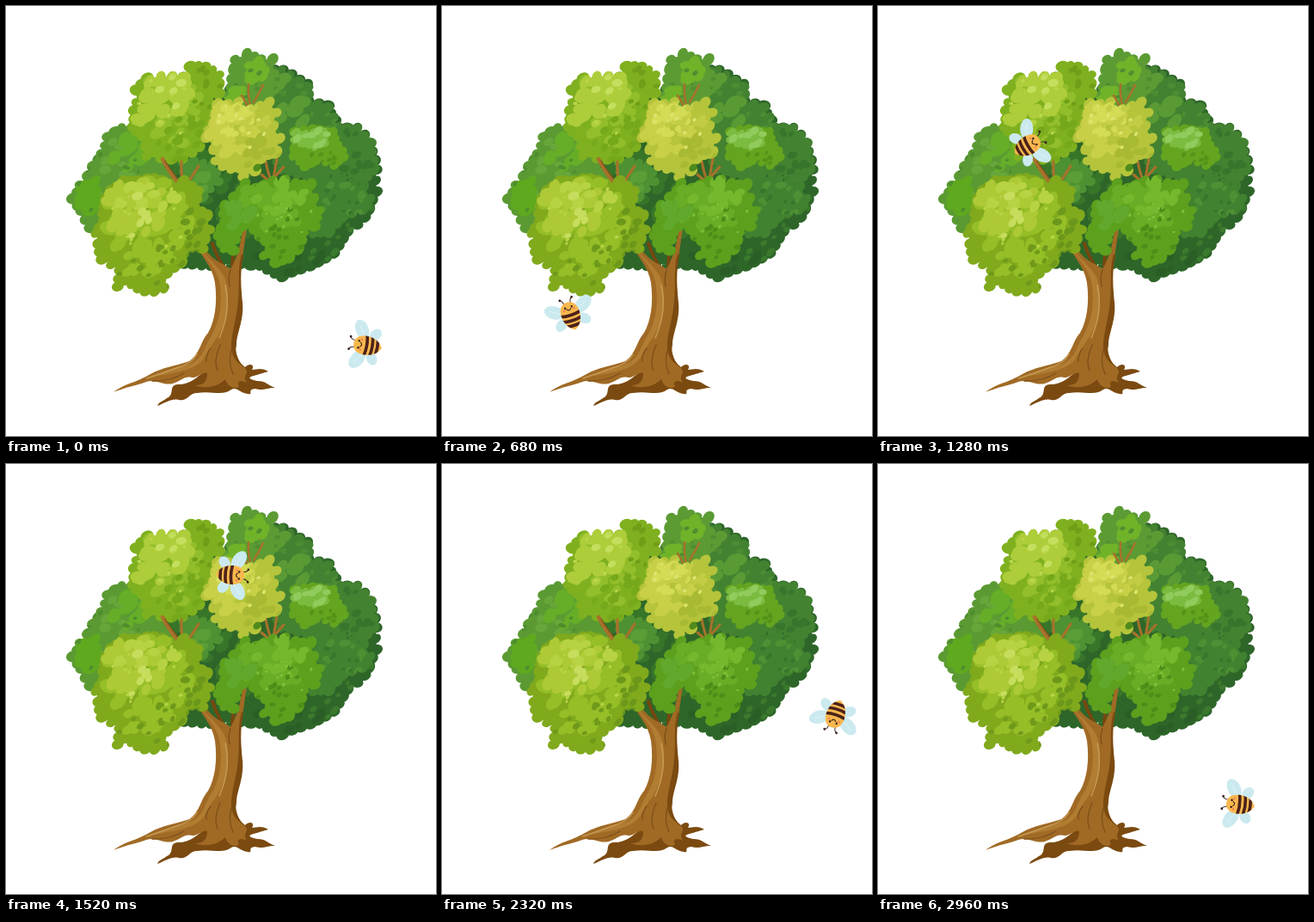
Animation of 500 by 500 pixels, one loop 3000 ms. Source, as an HTML page with a canvas:

```html
<!DOCTYPE html>
<html>
<head>
<meta charset="utf-8">
<title>Bee around a tree</title>
<style>
html, body { margin: 0; width: 100%; height: 100%; overflow: hidden; background: #fff; }
canvas { display: block; width: 500px; height: 500px; }
</style>
</head>
<body>
<canvas id="stage" width="500" height="500"></canvas>
<script>
const stage = document.getElementById('stage').getContext('2d');
const tree = document.createElement('canvas');
tree.width = tree.height = 500;
let g = tree.getContext('2d');

let seed = 7;
const rnd = (a, b) => {
  seed = (seed * 16807) % 2147483647;
  return a + (b - a) * seed / 2147483647;
};

// Closed outline, listed clockwise, with round leaf bumps along its edge
function puff(text, bump = 7) {
  const n = text.split(' ').map(Number), path = new Path2D(), count = n.length / 2;
  for (let i = 0; i < count; i++) path.lineTo(n[2 * i], n[2 * i + 1]);
  path.closePath();
  for (let i = 0; i < count; i++) {
    const j = (i + 1) % count, x = n[2 * i], y = n[2 * i + 1];
    const dx = n[2 * j] - x, dy = n[2 * j + 1] - y;
    const steps = Math.max(1, Math.round(Math.hypot(dx, dy) / (bump * 1.6)));
    for (let k = 0; k < steps; k++) {
      const px = x + dx * k / steps, py = y + dy * k / steps;
      const r = bump * rnd(.85, 1.2), turn = rnd(-1.2, .2);
      path.moveTo(px + r * Math.cos(turn), py + r * Math.sin(turn));
      path.ellipse(px, py, r, r * .8, turn, 0, 7);
    }
  }
  return path;
}

// Each leaf group: colour, amount, centre, spread, leaf size
function clump(outline, color, leaves = [], bump) {
  const path = puff(outline, bump);
  g.fillStyle = color;
  g.fill(path);
  g.save();
  g.clip(path);
  for (const [tint, amount, cx, cy, rx, ry, size] of leaves) {
    g.fillStyle = tint;
    for (let i = 0; i < amount; i++) {
      const a = rnd(0, 6.28), d = Math.sqrt(rnd(0, 1)), s = size * rnd(.7, 1.2);
      g.beginPath();
      g.ellipse(cx + rx * d * Math.cos(a), cy + ry * d * Math.sin(a), s, s * .7, rnd(-1.2, 0), 0, 7);
      g.fill();
    }
  }
  g.restore();
}

function fill(color, d) {
  g.fillStyle = color;
  g.fill(new Path2D(d));
}
function line(color, width, d) {
  g.strokeStyle = color;
  g.lineWidth = width;
  g.lineCap = 'round';
  g.stroke(new Path2D(d));
}

function drawCrownBack() {
  clump('290 76 322 74 350 92 352 112 374 116 386 142 408 142 424 160 430 190 431 216 418 246 398 262 382 288 354 302 322 314 296 302 250 300 196 301 170 270 180 180 240 110',
    '#2e6629', [
      ['#3b7a2d', 36, 380, 250, 48, 55, 4],
      ['#377529', 30, 240, 220, 60, 60, 8],
      ['#2a5e26', 14, 330, 290, 40, 20, 6]
    ]);
  clump('290 78 320 75 350 94 350 112 374 118 386 142 408 143 423 160 428 190 414 206 396 190 360 200 320 190 290 130',
    '#438230', [
      ['#4c8d33', 30, 345, 130, 42, 52, 4],
      ['#5a9a35', 8, 335, 125, 16, 25, 9],
      ['#38752c', 22, 405, 175, 24, 35, 5]
    ]);
  clump('368 206 390 202 416 210 424 224 414 238 392 244 376 262 358 264 356 230',
    '#418230', [['#4e9034', 12, 390, 225, 30, 22, 5], ['#37752b', 8, 384, 235, 30, 22, 3]]);
  clump('206 182 240 184 246 204 228 222 210 212', '#4e9133', [['#5b9d36', 6, 230, 200, 16, 16, 7]]);
}

function drawCrownTop() {
  clump('118 152 134 142 152 146 180 184 196 215 140 245 98 258 88 238 78 224 86 208 102 186 112 172',
    '#5b9a33', [
      ['#67a63a', 20, 120, 190, 40, 45, 6],
      ['#66ad28', 16, 140, 170, 22, 20, 8],
      ['#5fa91f', 18, 97, 220, 14, 20, 8],
      ['#4e8d2d', 14, 120, 205, 38, 45, 3]
    ]);
  clump('266 62 280 56 296 62 310 62 312 78 324 84 312 98 300 110 270 116 258 104 264 84',
    '#5c9b34', [
      ['#70b329', 9, 293, 77, 16, 12, 9],
      ['#70b329', 5, 266, 103, 10, 8, 8],
      ['#4e8e30', 8, 290, 88, 28, 25, 3]
    ]);
  clump('164 84 180 82 206 82 214 70 232 70 248 80 248 102 236 112 238 140 226 164 206 178 180 178 164 174 160 152 146 140 152 112 152 98',
    '#7fb01f', [
      ['#92be2b', 30, 190, 120, 35, 45, 8],
      ['#aecd3a', 38, 188, 102, 28, 25, 9],
      ['#aecd3a', 12, 168, 126, 18, 18, 7],
      ['#76a81b', 16, 205, 155, 32, 26, 6],
      ['#6f9e18', 10, 232, 95, 18, 24, 4],
      ['#c4df5d', 5, 186, 98, 20, 25, 6],
      ['#bad74e', 9, 192, 115, 38, 42, 2.5]
    ]);
  clump('336 146 356 143 380 147 386 162 394 176 382 184 362 180 348 186 334 174',
    '#64a41f', [
      ['#7bbb40', 24, 354, 155, 22, 11, 7],
      ['#92cb5d', 9, 356, 154, 20, 10, 5],
      ['#559318', 8, 370, 176, 25, 10, 3]
    ], 6);
  // Bare twigs
  const bark = '#a8712b';
  line(bark, 4.5, 'M182 178Q190 194 206 214');
  line(bark, 3.2, 'M204 181Q203 196 207 211M224 186Q216 199 207 211');
  line('#85511a', 1.3, 'M185 180Q193 194 205 207');
  line(bark, 2.5, 'M282 91Q281 105 285 118M299 92Q294 102 288 112M274 104L281 116');
  line(bark, 3, 'M302 180Q304 193 310 208M315 178Q312 193 311 202M323 187Q316 194 309 204M297 196L310 207');
  clump('246 114 270 112 284 120 306 112 314 124 310 140 318 154 314 170 296 178 290 192 276 198 262 190 244 180 242 166 234 152 240 136',
    '#b5c43a', [
      ['#c8d048', 42, 264, 142, 27, 31, 8],
      ['#d4db55', 18, 266, 132, 25, 18, 6],
      ['#a8ba33', 14, 296, 169, 24, 22, 6],
      ['#c2cd45', 15, 287, 130, 28, 15, 5],
      ['#dde570', 12, 275, 140, 36, 36, 2.4]
    ]);
  g.fillStyle = '#4f8b1c';
  g.beginPath();
  g.ellipse(292, 188, 5, 4, -.7, 0, 7);
  g.fill();
}

function drawTrunk() {
  line('#76470f', 4, 'M240 276Q246 295 259 312M265 283Q263 296 263 312');
  fill('#7b4a10', 'M236 420C222 432 215 440 200 440C188 441 197 452 187 456C182 460 178 460 176 465C187 461 192 456 201 458C211 460 213 450 222 450C240 447 251 454 262 446C268 442 272 450 281 451C289 453 279 446 290 445C299 448 302 444 313 444C302 440 303 436 292 436C283 434 280 432 288 430C295 428 298 427 305 425C296 420 292 423 286 423C290 416 282 415 278 420C270 415 268 405 266 395Z');
  fill('#a06a25', 'M217 273C226 289 240 303 243 322C246 345 243 366 235 380C226 390 226 404 213 413C196 419 182 420 168 428C152 438 137 439 125 449C140 443 153 441 163 437C175 433 182 442 194 439C204 436 207 430 216 432C222 433 230 424 234 427C234 440 226 441 219 441C234 446 247 442 255 434C257 442 266 447 271 442C267 436 274 434 280 438C274 428 284 428 278 421C269 415 266 408 267 397C266 380 276 365 274 345C273 325 272 315 273 303C276 290 277 275 280 260L275 262C272 280 268 295 261 306C255 300 245 299 236 288Z');
  fill('#7b4a10', 'M274 288C269 305 272 322 270 342C269 362 261 382 262 398C263 410 270 416 278 420C268 412 266 404 268 394C268 380 277 366 275 345C273 324 272 310 276 290Z');
  fill('#b17d32', 'M222 279C234 295 247 307 249 326C252 350 247 370 239 383C231 395 231 407 217 415C202 421 188 423 172 431C186 428 199 427 215 421C232 415 234 400 243 389C256 370 260 350 257 326C255 309 240 299 222 279Z');
  line('#c69a54', 1.5, 'M255 325C261 350 255 370 248 386M222 405Q216 416 198 421L164 433');
  line('#80501a', 1.4, 'M238 398Q232 405 233 413M249 394Q241 413 246 424M262 400Q258 415 264 428M261 307Q258 317 260 326M170 436Q190 437 207 427');
}

function drawCrownFront() {
  clump('278 206 292 212 310 204 324 202 336 208 354 208 358 224 364 238 358 256 346 264 340 282 330 292 314 298 300 290 302 274 290 260 274 256 266 272 264 284 254 282 248 266 254 250 254 232 266 222',
    '#5ca01d', [
      ['#69ad26', 42, 312, 231, 40, 27, 8],
      ['#75b82d', 18, 318, 221, 30, 18, 7],
      ['#61a82d', 15, 270, 243, 17, 15, 7],
      ['#4d8d18', 15, 326, 264, 36, 30, 3.5],
      ['#7fc038', 14, 320, 240, 40, 32, 2]
    ]);
  clump('136 204 154 202 172 200 190 206 206 204 222 216 220 234 234 244 236 260 228 282 206 280 204 298 188 312 184 328 162 332 146 324 130 326 132 308 112 294 108 276 104 264 114 250 114 232 120 214',
    '#80a91c', [
      ['#95be27', 70, 165, 249, 52, 46, 9],
      ['#95be27', 20, 160, 294, 32, 19, 7],
      ['#adca36', 42, 151, 234, 36, 31, 9],
      ['#b7d343', 14, 164, 222, 36, 20, 7],
      ['#6f991a', 16, 174, 300, 50, 28, 4],
      ['#6b971a', 12, 222, 260, 18, 32, 5],
      ['#c6dd5d', 6, 144, 242, 25, 26, 6],
      ['#b9d449', 16, 168, 245, 45, 38, 2.3]
    ]);
}

drawCrownBack();
drawCrownTop();
drawTrunk();
drawCrownFront();
g = stage;

// Bee route: time, x, y, heading in degrees
const route = [
  [0, 420, 395, 190], [280, 312, 387, 211], [560, 197, 373, 233], [680, 150, 360, 252],
  [860, 101, 302, 273], [1000, 109, 255, 291], [1120, 127, 210, 309], [1440, 226, 123, 351],
  [1520, 261, 129, 363], [1680, 333, 154, 386], [1840, 393, 194, 410], [2040, 441, 234, 434],
  [2240, 460, 277, 458], [2320, 458, 291, 468], [2800, 431, 371, 511], [2960, 421, 396, 547]
];
const LOOP = 3000;
function key(i) {
  const n = route.length, turn = Math.floor(i / n), [t, x, y, a] = route[i - turn * n];
  return [t + LOOP * turn, x, y, a + 360 * turn];
}

// Smooth curve through the route points
function pose(t) {
  let i = route.length - 1;
  while (route[i][0] > t) i--;
  const [k0, k1, k2, k3] = [-1, 0, 1, 2].map(d => key(i + d));
  const span = k2[0] - k1[0], u = (t - k1[0]) / span;
  return [1, 2, 3].map(c => {
    const m1 = (k2[c] - k0[c]) / (k2[0] - k0[0]) * span;
    const m2 = (k3[c] - k1[c]) / (k3[0] - k1[0]) * span;
    const d = k2[c] - k1[c];
    return k1[c] + u * (m1 + u * (3 * d - 2 * m1 - m2 + u * (m1 + m2 - 2 * d)));
  });
}

const body = new Path2D('M-17 0C-14 -7 -6 -11 2 -11C11 -11 16 -7 16 0C16 7 11 11 2 11C-6 11 -14 7 -17 0Z');
function oval(color, x, y, rx, ry, turn = 0) {
  g.fillStyle = color;
  g.beginPath();
  g.ellipse(x, y, rx, ry, turn, 0, 7);
  g.fill();
}
function drawBee([x, y, heading]) {
  g.save();
  g.translate(x, y);
  g.rotate(heading * Math.PI / 180);
  for (const s of [-1, 1]) {
    oval('#cbeaf0', -7.5, 14 * s, 8, 6, 2.25 * s);
    oval('#cbeaf0', 9, 17.5 * s, 12, 7.6, 1.02 * s);
    line('#e2f4f7', .8, `M5 ${11 * s}L12 ${22 * s}`);
    line('#3b2420', 1, `M14 ${4 * s}Q19 ${4 * s} 20.5 ${7 * s}`);
    oval('#3b2420', 20.5, 7.3 * s, 1.4, 1.4);
  }
  g.fillStyle = '#f8b84e';
  g.fill(body);
  g.save();
  g.clip(body);
  for (const p of [1, -5.5, -11.5]) line('#4c2219', 3.6, `M${p + 1} -12Q${p - 2} 0 ${p + 1} 12`);
  g.restore();
  for (const s of [-1, 1]) {
    oval('#35201c', 10, 4 * s, 1.3, 1.2);
    oval('#f28c55', 7.3, 6 * s, 1.3, 1.6);
  }
  line('#35201c', 1.1, 'M8.2 -2.4Q4.8 0 8.2 2.4');
  g.restore();
}

function frame(now) {
  const t = Math.floor(now % LOOP / 40) * 40;
  g.fillStyle = '#fff';
  g.fillRect(0, 0, 500, 500);
  g.drawImage(tree, 0, 0);
  drawBee(pose(t));
  requestAnimationFrame(frame);
}
frame(0);
</script>
</body>
</html>
```
